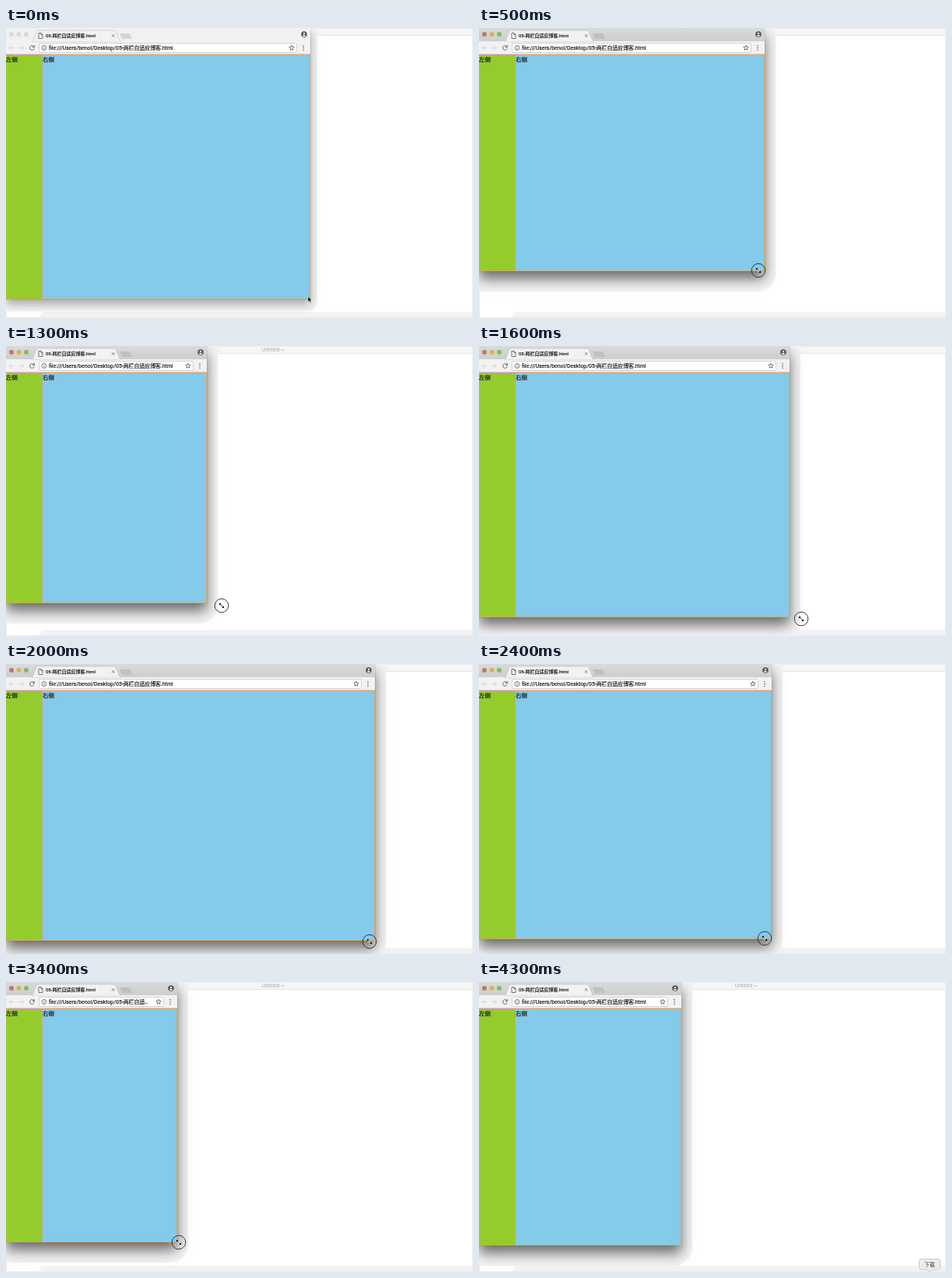
These frames come from a looping animation (600x372 px, 4.4 s). An HTML page:

```html
<!DOCTYPE html>
<html>
<head>
<meta charset="utf-8">
<title>Two-column layout</title>
<style>
html, body { margin: 0; width: 100%; height: 100%; overflow: hidden; background: #fff; }
#stage {
  position: relative; width: 600px; height: 372px; overflow: hidden; background: #fff;
  font-family: Roboto, "Noto Sans CJK SC", "Noto Sans CJK", sans-serif; white-space: nowrap;
}
#stage div, #stage svg { position: absolute; box-sizing: border-box; }

/* window behind */
.bar { left: 0; top: 0; width: 600px; height: 10px; background: #f6f6f6; border-bottom: 1px solid #e6e6e6; }
.doc { left: 329px; top: 0; font-size: 6.5px; line-height: 10px; color: #a8a8a8; }
.strip { left: 43px; top: 364px; width: 560px; height: 10px; background: #f3f3f3; border-radius: 7px 0 0 0; }
.frame { inset: 0; border: 1px solid #ececec; }

/* browser */
.halo {
  left: -20px; top: -20px; width: calc(var(--w) + 34px); height: calc(var(--h) + 46px);
  background: #f3f3f3; border-radius: 0 0 24px 24px;
}
.browser {
  left: 0; top: 0; width: var(--w); height: var(--h); background: #f2f2f2;
  box-shadow: 0 10px 16px rgba(0,0,0,.56), 0 0 1px rgba(0,0,0,.3);
}
.tabs { left: 0; top: 0; width: 100%; height: 17px; background: linear-gradient(#d8dadb, #cccfd0); }
.tools { left: 0; top: 17px; width: 100%; height: 17px; background: #f2f2f2; border-bottom: 1px solid #cfcfcf; }
.icons { left: 0; top: 0; }
.title, .url, .col { color: #1a1a1a; -webkit-text-stroke: .2px #1a1a1a; }
.title { left: 51px; top: 5px; font-size: 6px; line-height: 10px; }
.address { left: 42px; right: 17px; top: 19px; height: 13px; background: #fff; border: 1px solid #d2d2d2; border-radius: 2px; }
.url {
  left: 55px; top: 21px; width: calc(var(--w) - 88px); overflow: hidden; text-overflow: ellipsis;
  font-size: 6.9px; line-height: 10px;
}
.right { right: 0; top: 0; }
.col { top: 34px; bottom: 0; border: 1px solid; font-size: 7.4px; line-height: 11px; }
.left-col { left: -1px; width: 48px; background: #94cd2b; border-color: #d99a86; }
.right-col { left: 46px; right: 0; background: #84caea; border-color: #d9a869; border-left-color: #c6a594; }

.light { fill: var(--c); }
.idle .light { fill: #dadada; }
.idle .tabs { background: #f1f1f1; }
.idle .plus { fill: #d5d5d5; }
.idle .browser { box-shadow: 0 6px 12px rgba(0,0,0,.32), 0 0 1px rgba(0,0,0,.4); }
.idle .halo { width: calc(var(--w) + 29px); height: calc(var(--h) + 35px); border-radius: 0 0 12px 12px; }
.tip { left: 0; top: 0; }
</style>
</head>
<body>
<div id="stage">
  <div class="bar"></div>
  <div class="doc">Untitled</div>
  <svg width="600" height="12" fill="none" stroke="#aaa" stroke-width=".8"><path d="M353.5 4l2 2 2-2"/></svg>
  <div class="strip"></div>
  <div class="frame"></div>
  <div class="halo"></div>

  <div class="browser">
    <div class="tabs"></div>
    <div class="tools"></div>
    <div class="address"></div>
    <svg class="icons" width="170" height="34" fill="none">
      <circle class="light" cx="7" cy="8" r="3" style="--c:#c4785f"/>
      <circle class="light" cx="16.5" cy="8" r="3" style="--c:#cdb955"/>
      <circle class="light" cx="26" cy="8" r="3" style="--c:#84be56"/>
      <path d="M33 17.5C36 16.5 37 4 41 3H139C143 4 144 16.5 148 17.5Z" fill="#f2f2f2" stroke="#b9b9b9" stroke-width=".6"/>
      <path d="M33 17.4H148V19H33Z" fill="#f2f2f2"/>
      <path class="plus" d="M146 7H158Q159 7 159.5 8L162 14H150Q149 14 148.5 13Z" fill="#bec1c1"/>
      <path d="M42 6.5H45L47 8.5V13.5H42ZM45 6.5V8.5H47" stroke="#555" stroke-width=".8"/>
      <path d="M136 8.2l3.4 3.4M139.4 8.2l-3.4 3.4" stroke="#666" stroke-width=".8"/>
      <path d="M10.5 25.5H4M7 22.5l-3 3 3 3M16 25.5H22.5M19.5 22.5l3 3-3 3" stroke="#d6d6d6"/>
      <path d="M35.8 23.7A2.9 2.9 0 1 0 36.3 26.2M36.4 22V24.5H33.9" stroke="#666"/>
      <circle cx="49" cy="25.5" r="3" stroke="#555" stroke-width=".8"/>
      <path d="M49 25v2.2M49 23.5v.8" stroke="#555" stroke-width=".9"/>
    </svg>
    <div class="title">05-两栏自适应博客.html</div>
    <div class="url">file:///Users/benol/Desktop/05-两栏自适应博客.html</div>
    <svg class="right" width="32" height="34" fill="#555">
      <circle cx="24" cy="8" r="3.8"/>
      <circle cx="24" cy="6.9" r="1.2" fill="#eee"/>
      <path d="M21.8 10Q24 7.6 26.2 10Q24 11.8 21.8 10Z" fill="#eee"/>
      <path id="star" fill="none" stroke="#555" stroke-width=".8"/>
      <path d="M23 22.7h0m0 2.8h0m0 2.8h0" stroke="#555" stroke-width="1.6" stroke-linecap="round"/>
    </svg>
    <div class="col left-col">左侧</div>
    <div class="col right-col">右侧</div>
  </div>

  <svg id="pointer" width="24" height="24" viewBox="-12 -12 24 24">
    <path id="arrow" d="M-3-3V4.5L-1.3 3 0 5.8 1.2 5.2 0 2.6H2Z" fill="#111" stroke="#fff" stroke-width=".5"/>
    <g id="resize" fill="#111" transform="scale(.85)">
      <path d="M-2-2L2 2" stroke="#fff" stroke-width="2.4"/>
      <path d="M-2.5-2.5L2.5 2.5" stroke="#111"/>
      <path d="M-3.6-3.6H-.3L-3.6-.3ZM3.6 3.6H.3L3.6.3Z"/>
    </g>
    <circle id="press" r="8.8" fill="none" stroke="#2a2a2a" stroke-width=".9"/>
  </svg>

  <svg class="tip" id="tip" width="600" height="372">
    <path d="M568 355.5H590Q592.5 355.5 592.5 358V366.5Q592.5 369 590 369H582L579 372 576 369H568Q565.5 369 565.5 366.5V358Q565.5 355.5 568 355.5Z" fill="#ececec" stroke="#cbcbcb"/>
    <text x="579" y="364.8" font-size="6.8" text-anchor="middle" fill="#333">下载</text>
  </svg>
</div>

<script>
const STEP = 100, STEPS = 44, LEAD = 0.4;

// Turning points of the dragged corner: step, width, height
const DRAG = [
  [0, 391, 348], [5, 367, 312], [11, 204, 320], [16, 399, 348], [19, 483, 355],
  [24, 376, 353], [30, 244, 335], [33, 218, 334], [43, 260, 338]
];

const $ = id => document.getElementById(id);
const stage = $("stage");
const show = (id, on) => { $(id).style.display = on ? "" : "none"; };

const starPoints = Array.from({ length: 10 }, (_, i) => {
  const r = i % 2 ? 1.5 : 3.4, a = i * Math.PI / 5;
  return `${8 + r * Math.sin(a)} ${25.5 - r * Math.cos(a)}`;
});
$("star").setAttribute("d", `M${starPoints.join("L")}Z`);

// Slope through the neighbours; the drag starts and ends at rest
function slope(i, axis) {
  const a = DRAG[i - 1], b = DRAG[i + 1];
  return a && b ? (b[axis] - a[axis]) / (b[0] - a[0]) : 0;
}

// Smooth cubic through the turning points
function corner(step, axis) {
  const t = Math.min(step, STEPS - 1);
  const i = Math.max(1, DRAG.findIndex(k => k[0] >= t));
  const a = DRAG[i - 1], b = DRAG[i], span = b[0] - a[0];
  const u = (t - a[0]) / span, v = 1 - u;
  return Math.round(
    v * v * (1 + 2 * u) * a[axis] + u * u * (1 + 2 * v) * b[axis] +
    u * v * span * (v * slope(i - 1, axis) - u * slope(i, axis))
  );
}

function draw() {
  const step = Math.floor(performance.now() / STEP) % STEPS;
  const first = step === 0, last = step === STEPS - 1;
  stage.style.setProperty("--w", corner(step, 1) + "px");
  stage.style.setProperty("--h", corner(step, 2) + "px");
  stage.classList.toggle("idle", first);

  // The window trails slightly behind the pointer
  const x = corner(step + LEAD, 1), y = corner(step + LEAD, 2);
  $("pointer").style.transform = `translate(${x - 12}px, ${y - 12}px)`;
  show("pointer", !last);
  show("arrow", first);
  show("resize", !first);
  show("press", !first);
  show("tip", last);
  requestAnimationFrame(draw);
}
draw();
</script>
</body>
</html>
```
